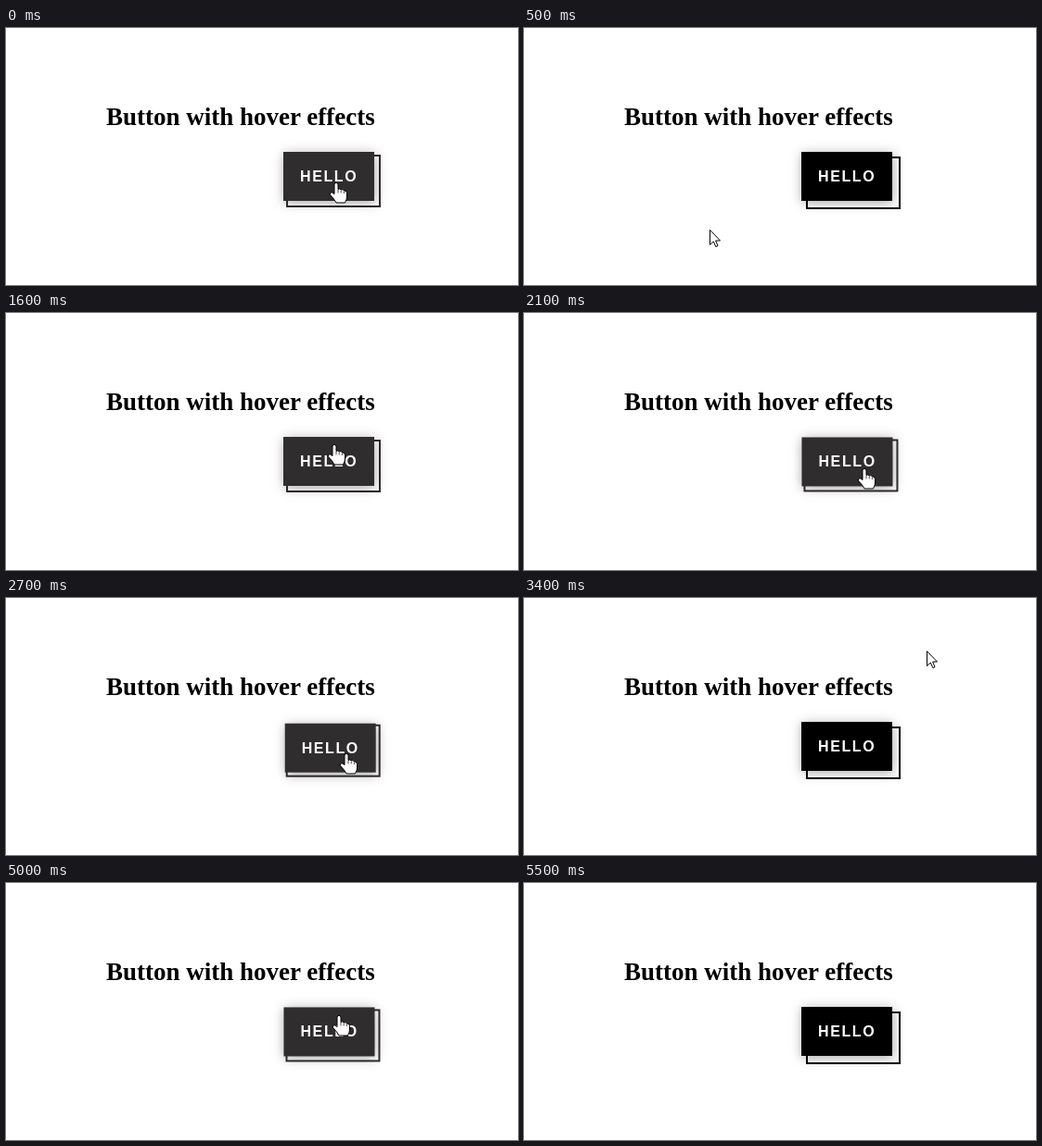
Recreate the animation shown at these times as an HTML page. Size 552 px wide and 278 px high, loop 6900 ms.

```html
<!DOCTYPE html>
<html lang="en">
<head>
<meta charset="utf-8">
<title>Button with hover effects</title>
<style>
  html, body {
    margin: 0;
    width: 100%;
    height: 100%;
    overflow: hidden;
    background: #fff;
  }
  h1 {
    position: absolute;
    left: 108px;
    top: 81px;
    margin: 0;
    font: bold 27px/31px "Liberation Serif", "Times New Roman", serif;
    color: #000;
    white-space: nowrap;
  }
  .button {
    position: absolute;
    left: 299px;
    top: 134px;
    width: 98px;
    height: 53px;
    transform: translate(var(--press), var(--press));
  }
  .face {
    position: absolute;
    inset: 0;
    box-sizing: border-box;
    padding-left: 18px;
    background: var(--ink);
    box-shadow: 1px 2px 12px rgba(0, 0, 0, .35);
    color: #fff;
    font: bold 16px/53px "Liberation Sans", Arial, sans-serif;
    letter-spacing: 1.6px;
    white-space: nowrap;
  }
  .outline {
    position: absolute;
    left: var(--gap);
    top: var(--gap);
    width: 98px;
    height: 53px;
    border: 2px solid var(--ink);
  }
  svg {
    position: absolute;
    inset: 0;
  }
  svg path { stroke: #000; fill: #fff; }
  #hand .knuckles { stroke-width: .7; }
  #text path { fill: none; shape-rendering: crispEdges; }
</style>
</head>
<body>
<h1>Button with hover effects</h1>
<div class="button">
  <div class="outline"></div>
  <div class="face">HELLO</div>
</div>
<svg width="552" height="278">
  <g id="hand">
    <path d="M-2 2Q0-1.6 2 2V7.5Q4 6 5.2 8Q7.4 6.8 8.4 9Q11 8.4 11.5 11.5V16Q11.5 18 9.5 22H0Q-2 18-6.5 13.5Q-6.8 10-4 11L-2 12.6Z"/>
    <path class="knuckles" d="M2 8V11.5M5.2 8.6V11.5M8.4 9.5V12"/>
  </g>
  <g id="arrow"><path d="M.5.5V16.5L4.3 13L6.8 18.6L9 17.6L6.6 12H11.5Z"/></g>
  <g id="text"><path d="M-3-6.5H4M.5-6.5V7.5M-3 7.5H4"/></g>
</svg>
<script>
const LOOP = 6.9, RATE = 10;          // seconds, pictures per second
const POINTER_GONE = 5.5;

// Turning points of the pointer: [seconds, x, y]
const turns = [
  [0, 356, 167], [.3, 300, 215], [.6, 150, 220], [.8, 86, 259],
  [1, 143, 84], [1.1, 205, 39], [1.4, 340, 115], [1.8, 367, 168],
  [2.8, 367, 168], [3.2, 462, 88], [3.4, 434, 57], [3.6, 376, 126],
  [3.9, 362, 158], [4.3, 359, 143], [5, 359, 143], [5.4, 370, 102]
];
const hovers = [[-1, .1], [1.4, 2.9], [3.6, 5.1]];
const clicks = [2, 2.36, 2.72, 4.9];

const clamp = v => Math.max(0, Math.min(1, v));
const mix = (a, b, p) => a + (b - a) * p;

function pointerAt(t) {
  const i = Math.max(1, turns.findIndex(k => k[0] > t));
  const [t0, x0, y0] = turns[i - 1], [t1, x1, y1] = turns[i];
  const p = clamp((t - t0) / (t1 - t0));
  return [Math.round(mix(x0, x1, p)), Math.round(mix(y0, y1, p))];
}

const hoverAt = t => hovers.reduce(
  (sum, [from, to]) => sum + clamp((t - from) / .2) - clamp((t - to) / .2), 0);

const pressAt = t => Math.max(
  ...clicks.map(c => clamp(1 - Math.abs(t - c) / .13)));

const inside = (x, y, l, t, r, b) => x >= l && x < r && y >= t && y < b;

function cursorAt(x, y) {
  if (inside(x, y, 299, 134, 406, 196)) return "hand";
  if (inside(x, y, 108, 81, 397, 112)) return "text";
  return "arrow";
}

const cursors = document.querySelectorAll("svg g");
const button = document.querySelector(".button");

function draw(t) {
  const hover = hoverAt(t), press = pressAt(t);
  const ink = [47, 45, 46].map(c => Math.round(c * hover));
  button.style.setProperty("--press", 2 * press + "px");
  button.style.setProperty("--gap", Math.floor(5.001 - 2 * hover - 2 * press) + "px");
  button.style.setProperty("--ink", `rgb(${ink})`);

  const [x, y] = pointerAt(t);
  const kind = t < POINTER_GONE ? cursorAt(x, y) : "";
  for (const c of cursors) {
    c.style.display = c.id === kind ? "" : "none";
    c.setAttribute("transform", `translate(${x} ${y})`);
  }
}

const start = performance.now();
function tick() {
  const t = (performance.now() - start) / 1000 % LOOP;
  draw(Math.floor(t * RATE) / RATE);
  requestAnimationFrame(tick);
}
tick();
</script>
</body>
</html>
```
